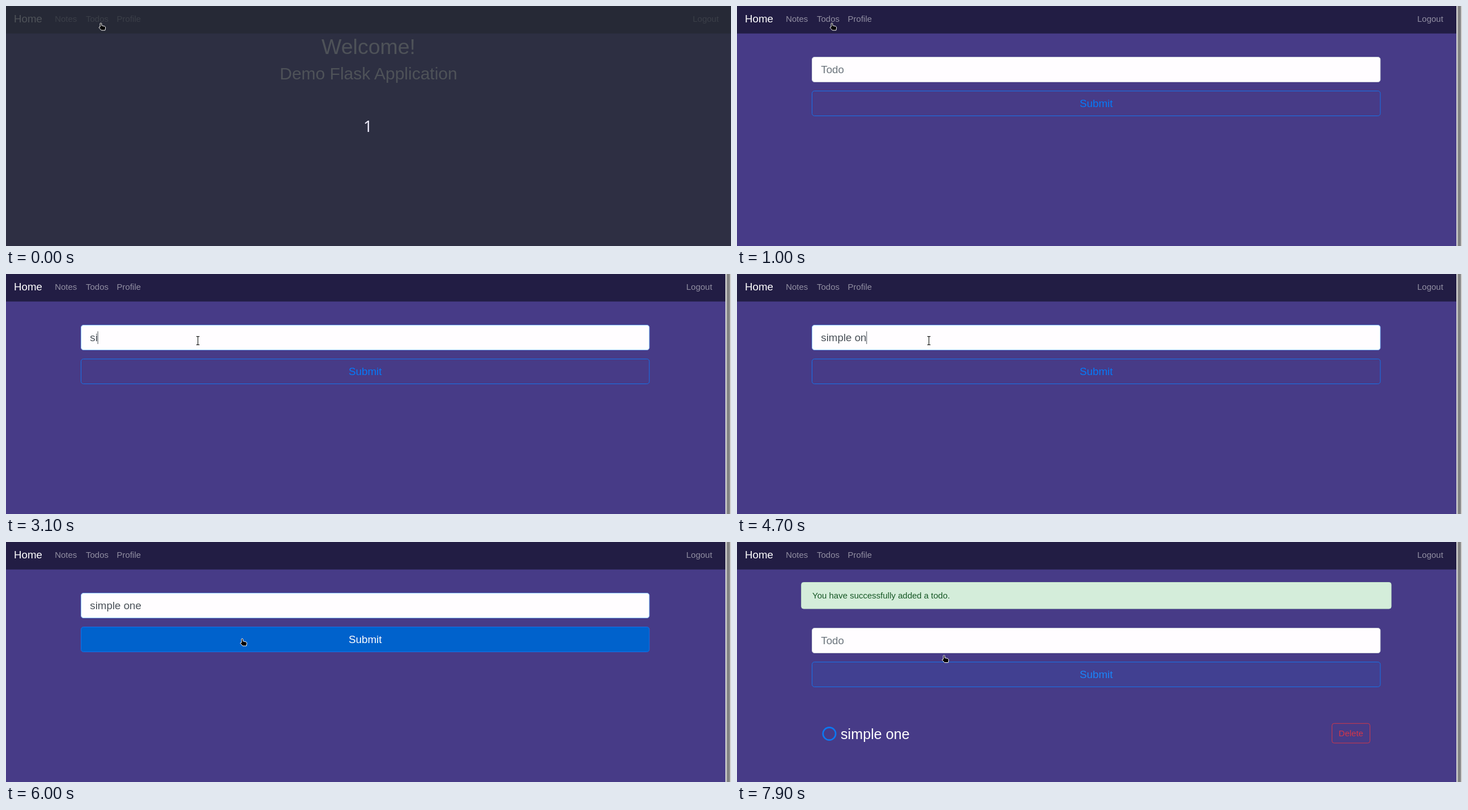
An HTML page that plays this animation: 1280 by 425 pixels, repeating every 8000 ms.

```html
<!DOCTYPE html>
<html lang="en">
<head>
<meta charset="utf-8">
<title>Todo demo</title>
<style>
  html, body { margin: 0; width: 100%; height: 100%; overflow: hidden; background: #473b87; }
  svg { display: block; width: 1280px; height: 425px; font: 15px "Liberation Sans", Arial, sans-serif; }
  .brand, .large { font-size: 18.75px; }
  .brand, .white { fill: #fff; }
  .link { fill: #fff; fill-opacity: .5; }
  .mid { text-anchor: middle; }
  .placeholder { fill: #6c757d; }
  .typed { fill: #495057; }
  #count { font: 28px "Noto Sans", sans-serif; fill: #eceaf8; }
</style>
</head>
<body>
<svg viewBox="0 0 1280 425">
  <rect width="1280" height="425" fill="#473b87"/>
  <rect width="1280" height="48.7" fill="#221d44"/>
  <text class="brand" x="14" y="29">Home</text>
  <text class="link" x="86.2" y="28.2">Notes</text>
  <text class="link" id="todos" x="141" y="28.2">Todos</text>
  <text class="link" x="195.6" y="28.2">Profile</text>
  <text class="link" id="logout" y="28.2">Logout</text>

  <g id="home">
    <text class="white mid" x="640" y="85" font-size="37.5">Welcome!</text>
    <text class="white mid" x="640" y="129.7" font-size="30">Demo Flask Application</text>
    <g id="overlay">
      <rect width="1280" height="425" fill="#282c34" fill-opacity=".82"/>
      <text id="count" class="mid" x="639" y="222.5">1</text>
    </g>
  </g>

  <g id="page">
    <g id="form">
      <rect id="input" x="132.5" y="90.5" width="1003.3" height="44" rx="4.2" fill="#fffdff"/>
      <text id="hint" class="large placeholder" x="148.3" y="119.2">Todo</text>
      <text id="value" class="large typed" x="148.3" y="119.2"></text>
      <rect id="caret" y="101.5" width="1" height="22.5" fill="#495057"/>
      <rect id="button" x="132.5" y="150.5" width="1003.3" height="44" rx="4.2" stroke="#1673ea"/>
      <text id="submit" class="large mid" x="634.3" y="179.2">Submit</text>
    </g>
    <g id="result">
      <rect x="113.7" y="71.5" width="1041.3" height="46.6" rx="3.8" fill="#d4edda" stroke="#c3e6cb"/>
      <text x="133" y="100.4" fill="#155724">You have successfully added a todo.</text>
      <circle id="check" cx="163" cy="339.5" r="11.2" fill="none" stroke="#0c78f2" stroke-width="2.7"/>
      <text id="item" class="white" y="349.4" font-size="25.2">simple one</text>
      <rect x="1050.5" y="321.3" width="67" height="34.7" rx="3.8" fill="none" stroke="#d03749"/>
      <text class="mid" x="1084" y="344.3" fill="#d63648">Delete</text>
    </g>
    <rect x="1270" width="10" height="425" fill="#d0d0d0"/>
    <rect x="1272.5" width="5.5" height="425" fill="#838383"/>
  </g>

  <g id="hand">
    <path d="M-1.3 .8Q0 -.7 1.3 .8V4.6L6.8 6Q8.4 6.6 8.2 8.8L7.4 13H.9L-3.2 8.6Q-3.6 6.7 -1.3 7.2Z"
      fill="#000" stroke="#fff" stroke-linejoin="round"/>
  </g>
  <g id="beam" fill="none">
    <path d="M-2.8 -7.4H2.8M0 -7.4V7.4M-2.8 7.4H2.8" stroke="#fff" stroke-width="3"/>
    <path d="M-2.8 -7.4H2.8M0 -7.4V7.4M-2.8 7.4H2.8" stroke="#222" stroke-width="1.2"/>
  </g>
</svg>
<script>
  const LOOP = 8000, LABEL = "simple one", LEFT = 148.3;
  const $ = id => document.getElementById(id);
  const show = (id, on) => $(id).setAttribute("visibility", on ? "inherit" : "hidden");
  const set = (id, name, value) => $(id).setAttribute(name, value);

  // Each list holds [time, ...values]; a value stays until the next entry.
  const pointer = [
    [0, "hand", 167.5, 30],
    [1500, "beam", 336, 106.5], [1700, "beam", 334, 115], [1800, "beam", 332, 120.5],
    [2000, "beam", 331.5, 119.5], [2300, "beam", 338.8, 118],
    [5400, "beam", 352, 119], [5500, "beam", 392, 123], [5600, "beam", 428, 128],
    [5700, "hand", 449.8, 142.3], [5800, "hand", 417, 171],
    [6500, "beam", 417.8, 178.5], [7300, "beam", 410, 155],
    [7500, "beam", 408, 157], [7600, "beam", 400, 165], [7700, "beam", 390, 177],
    [7800, "beam", 377, 190], [7900, "hand", 365.5, 200.5]
  ];
  const typing = [
    [0, 0], [2900, 1], [3100, 2], [3300, 3], [3500, 4], [3700, 6], [3900, 7],
    [4600, 8], [4700, 9], [4800, 10], [6500, 0]
  ];
  const caret = [[0, 0], [2100, 1], [3300, 0], [3500, 1], [4400, 0], [4600, 1], [5400, 0]];
  const hover = [[0, 0], [5700, .2], [5800, 1], [6500, 0], [7900, .08]];
  const focus = [[0, 0], [2300, .5], [2400, 1], [6500, 0]];

  const at = (list, t) => list.filter(step => step[0] <= t).pop().slice(1);
  const mix = (a, b, k) => `rgb(${a.map((v, i) => Math.round(v + (b[i] - v) * k))})`;

  const pen = document.createElement("canvas").getContext("2d");
  pen.font = '18.75px "Liberation Sans", Arial, sans-serif';

  function draw(t) {
    const done = t >= 6500;
    show("home", t < 1000);
    show("overlay", t < 300);
    show("page", t >= 1000);
    show("result", done);
    set("logout", "x", t < 1000 ? 1212.5 : 1201);
    set("todos", "fill-opacity", t < 1500 ? .75 : .5);
    set("form", "transform", `translate(0 ${done ? 62 : 0})`);

    const typed = LABEL.slice(0, at(typing, t)[0]);
    $("value").textContent = typed;
    show("hint", !typed);
    show("caret", at(caret, t)[0]);
    set("caret", "x", LEFT - .2 + pen.measureText(typed).width);
    set("input", "stroke", mix([206, 212, 218], [128, 189, 255], at(focus, t)[0]));

    const k = at(hover, t)[0], pressed = t >= 6000 && !done;
    set("button", "fill", pressed ? "#0062cc" : mix([71, 59, 135], [0, 123, 255], k));
    set("submit", "fill", mix([6, 122, 248], [255, 255, 255], k));

    const listed = t >= 6700;
    show("check", done && listed);
    set("item", "x", listed ? 183 : 174);

    const [kind, x, y] = at(pointer, t);
    for (const id of ["hand", "beam"]) show(id, id === kind);
    set(kind, "transform", `translate(${x} ${y})`);
  }

  const start = performance.now();
  function tick() {
    draw((performance.now() - start) % LOOP);
    requestAnimationFrame(tick);
  }
  tick();
</script>
</body>
</html>
```
